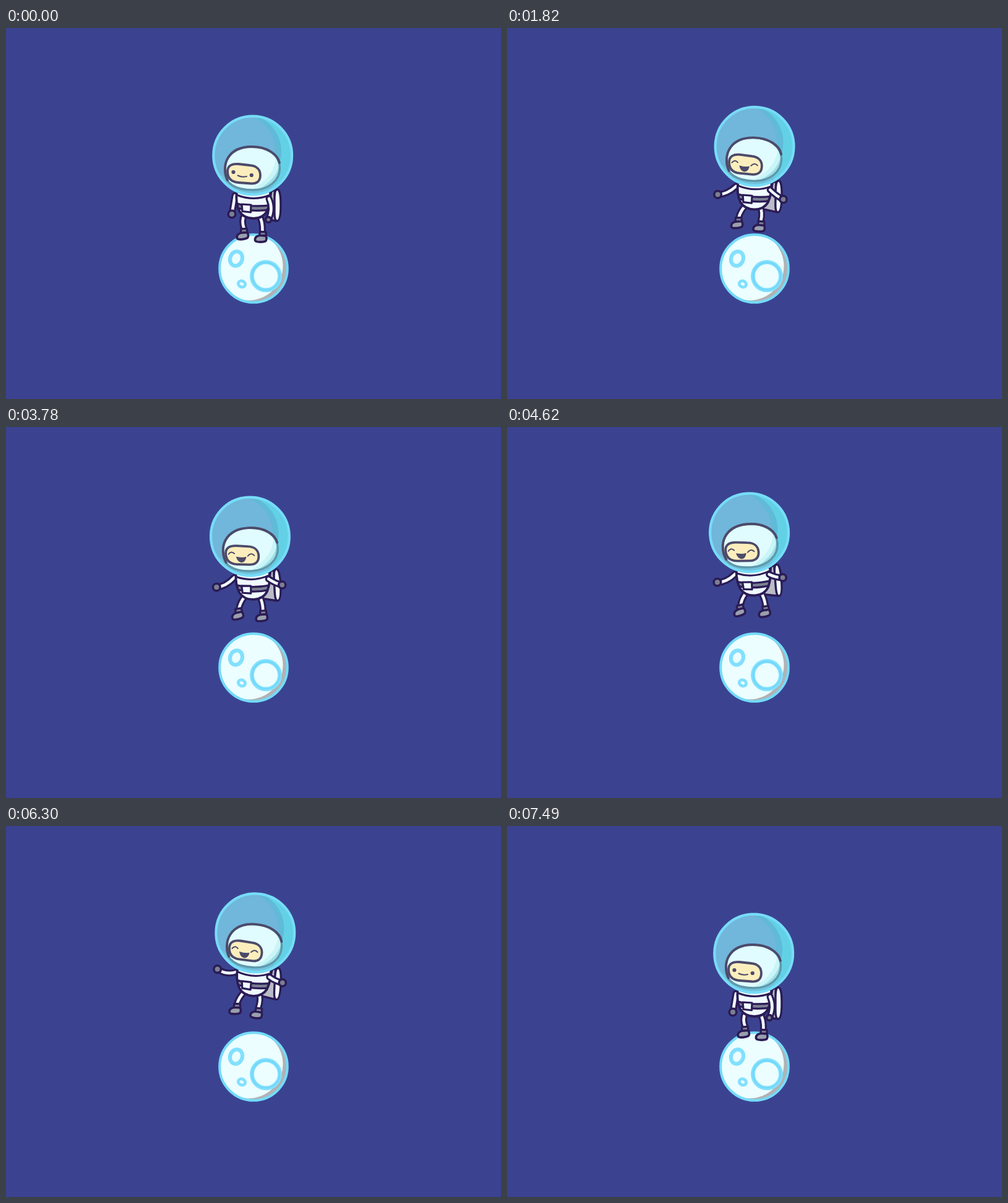
Write an HTML page with a canvas that moves like this. It is 800 by 600 pixels and loops after 8 s.

```html
<!DOCTYPE html>
<html lang="en">
<head>
<meta charset="utf-8">
<title>Moon hop</title>
<style>
html, body { margin: 0; width: 100%; height: 100%; overflow: hidden; background: #3b4390; }
canvas { display: block; }
</style>
</head>
<body>
<canvas id="stage" width="800" height="600"></canvas>
<script>
const ctx = document.getElementById('stage').getContext('2d');
const LOOP = 8000, STEP = 70, START = 700, END = 7490;
const INK = '#2b1b55', GREY = '#9a9fac', DARK = '#7b8092', WHITE = '#f0fbff', TINT = '#4c4a6a';

// [time, value] keys, eased in and out between neighbours
const BODY_Y = [[700, 0], [1050, 6], [1400, -3], [2430, -35.7], [3350, -22.5], [4200, -35.5],
  [4700, -35.5], [5600, -22.5], [6580, -35.7], [7000, 5], [7350, -1], [7490, 0]];
const STRETCH = [[700, 0], [1050, -6], [1400, 3], [1540, 8], [1820, 0],
  [6650, 0], [6860, 6], [7000, -5], [7350, 1], [7490, 0]];
const SWAY = [[1100, 0], [2700, 3.3], [4410, -7.5], [6200, 4.2], [7350, 0]];
const FLOAT = [[1050, 0], [1750, 1], [6600, 1], [7250, 0]];

function track(keys, t) {
  if (t <= keys[0][0]) return keys[0][1];
  for (let i = 1; i < keys.length; i++) {
    const [t0, a] = keys[i - 1], [t1, b] = keys[i];
    if (t <= t1) return a + (b - a) * (1 - Math.cos(Math.PI * (t - t0) / (t1 - t0))) / 2;
  }
  return keys[keys.length - 1][1];
}

const mix = (a, b, k) => a + (b - a) * k;
const mixPoint = (a, b, k) => [mix(a[0], b[0], k), mix(a[1], b[1], k)];

function paint(path, fill, stroke, width) {
  if (fill) { ctx.fillStyle = fill; ctx.fill(path); }
  if (stroke) { ctx.strokeStyle = stroke; ctx.lineWidth = width; ctx.stroke(path); }
}

const shape = (d, fill, stroke, width) => paint(new Path2D(d), fill, stroke, width);

function oval(x, y, rx, ry, turn = 0) {
  const path = new Path2D();
  path.ellipse(x, y, rx, ry, turn, 0, Math.PI * 2);
  return path;
}

const disc = (x, y, r) => oval(x, y, r, r);

function clipped(path, draw) {
  ctx.save();
  ctx.clip(path);
  draw();
  ctx.restore();
}

function limb(from, bend, to) {
  const path = new Path2D();
  path.moveTo(...from);
  path.quadraticCurveTo(...bend, ...to);
  paint(path, null, INK, 11);
  paint(path, null, WHITE, 4.6);
}

function moon() {
  const ball = disc(400, 389, 54.8);
  paint(ball, '#b1b2b4');
  clipped(ball, () => paint(disc(392, 385, 55.5), '#ecfeff'));
  paint(ball, null, '#74dbf9', 4);
  paint(oval(372, 373, 9.8, 11.8, 0.35), null, '#82e0fe', 6.2);
  paint(oval(381, 414, 5.8, 4.8, 0.4), null, '#82e0fe', 4.8);
  paint(disc(420, 401.3, 22.6), null, '#82e0fe', 6.8);
  paint(disc(420, 401.3, 22.2), null, '#6cd4f7', 1.6);
}

function pack(k) {
  const left = mix(430, 412, k);
  shape(`M429 264L434 262L437 312L${left} ${mix(311, 307, k)}L424 289Z`, '#b9bcc6', INK, 3.4);
  shape('M438 261C443 260 444 274 444 286C444 298 443 312 438 312C433 312 434 298 434 286C434 274 433 262 438 261Z',
    WHITE, INK, 3.4);
}

function leg(hip, bend, foot, turn) {
  const [x, y] = foot;
  limb(hip, bend, [x + 3, y - 11]);
  ctx.save();
  ctx.translate(x, y);
  ctx.rotate(turn);
  shape('M-9 2C-9 -3 -4 -5 1 -5L8 -5C10 -2 10 2 8 4C4 6 -4 6 -7 5Q-9 4 -9 2Z', GREY, INK, 3.6);
  shape('M-1.5 -11L8 -11L8.5 -5L-2 -5Z', DARK, INK, 3.2);
  ctx.restore();
}

function torso() {
  const body = new Path2D('M373 264C371 280 374 290 377 296C383 306 392 308 400 308C411 308 418 303 422 296C427 284 428 275 427 264Z');
  paint(body, WHITE);
  clipped(body, () => {
    shape('M370 283Q398 291 430 286L430 293Q400 299 370 290Z', DARK, INK, 3.2);
  });
  paint(body, null, INK, 3.8);
  shape('M373 270Q400 281 427 270', null, INK, 3);
  shape('M381 285L396 286L395.5 298L382 296.5Z', WHITE, INK, 3.2);
}

function arm(shoulder, bend, hand, size) {
  limb(shoulder, bend, hand);
  paint(disc(...hand, size), DARK, INK, 3.6);
}

function face(happy) {
  shape('M358 232C358 222 366 219 376 220L394 222C406 223 411 230 411 238C411 248 405 252 396 251.5L376 250C364 249 358 243 358 232Z',
    '#fceebc', TINT, 3.8);
  if (happy) {
    shape('M362.5 233Q367 227 372 232.5M393.5 237.5Q399 231.5 404 237', null, TINT, 2);
    shape('M375 238Q383 240.5 390.5 239Q388.5 247 383 247Q377 246 375 238Z', TINT, TINT, 1);
  } else {
    paint(disc(367.5, 233, 3.1), TINT);
    paint(disc(396.8, 238, 3.1), TINT);
    shape('M374.5 238.5Q381 241.8 389 240', null, TINT, 2);
  }
}

function helmet(happy) {
  const glass = disc(398.7, 206, 63.4);
  paint(glass, '#62d1e6');
  clipped(glass, () => {
    paint(disc(383, 200, 62), '#60bad8');
    paint(disc(375, 199, 60), '#71b6db');
    shape('M330 225Q370 262 435 240L425 280L340 280Z', '#71c2dc');
  });
  const head = new Path2D('M353.5 232C353 206 372 192 397 192C424 192 442 207 442.5 225C443 247 424 262 399 262C371 262 354 252 353.5 232Z');
  paint(head, '#e1fcfe');
  clipped(head, () => {
    shape('M436 200Q440 240 392 264L450 264L450 200Z', '#c9f5f8');
    shape('M443 212Q440 248 400 264L450 264Z', '#9fdfe7');
  });
  paint(head, null, '#5f98ab', 3.4);
  shape('M358 246C347 222 358 192 397 192C422 192 439 204 442 218', null, TINT, 3.8);
  face(happy);
  paint(glass, null, '#77dcf8', 4.2);
}

function astronaut(t) {
  const dy = track(BODY_Y, t), stretch = track(STRETCH, t);
  const sway = track(SWAY, t), k = track(FLOAT, t);
  const bob = k * Math.max(-1, Math.min(1, (dy + 29) / 6.5));
  const lean = k * sway / 4;

  ctx.save();
  ctx.translate(399, 291 + dy);
  ctx.rotate(sway / 85);
  ctx.translate(-399, -291);

  pack(k);
  const footL = mixPoint([382, 336], [372, 333], k);
  const footR = mixPoint([411.5, 340.5], [408.5 - 2 * lean, 338], k);
  footL[1] += stretch;
  footR[1] += stretch;
  leg([385, 303], [mix(380, 377, k), 312], footL, -0.08 + 0.06 * lean);
  leg([409, 303], [mix(415, 414, k), 312], footR, 0.05 + 0.06 * lean);

  const handL = mixPoint([365, 301], [340.5, 279 + 8 * bob - 6 * lean], k);
  const handR = mixPoint([424, 310], [446.5, 287 + 4 * bob], k);
  const bendL = mixPoint([370, 271], handL, 0.5);
  const bendR = mixPoint([425, 276], handR, 0.5);
  arm([370, 271], [bendL[0], bendL[1] + 7 * k], handL, 5.8);
  torso();
  arm([425, 276], [bendR[0] + 8 * (1 - k), bendR[1] + 3 * k], handR, mix(4.4, 5.6, k));

  helmet(k > 0.4);
  ctx.restore();
}

function draw(time) {
  const held = time < START ? 0
    : Math.min(END, START + Math.floor((time - START) / STEP) * STEP);
  ctx.fillStyle = '#3b4390';
  ctx.fillRect(0, 0, 800, 600);
  moon();
  astronaut(held);
}

const origin = performance.now();

function tick() {
  draw((performance.now() - origin) % LOOP);
  requestAnimationFrame(tick);
}

ctx.lineJoin = ctx.lineCap = 'round';
tick();
</script>
</body>
</html>
```
